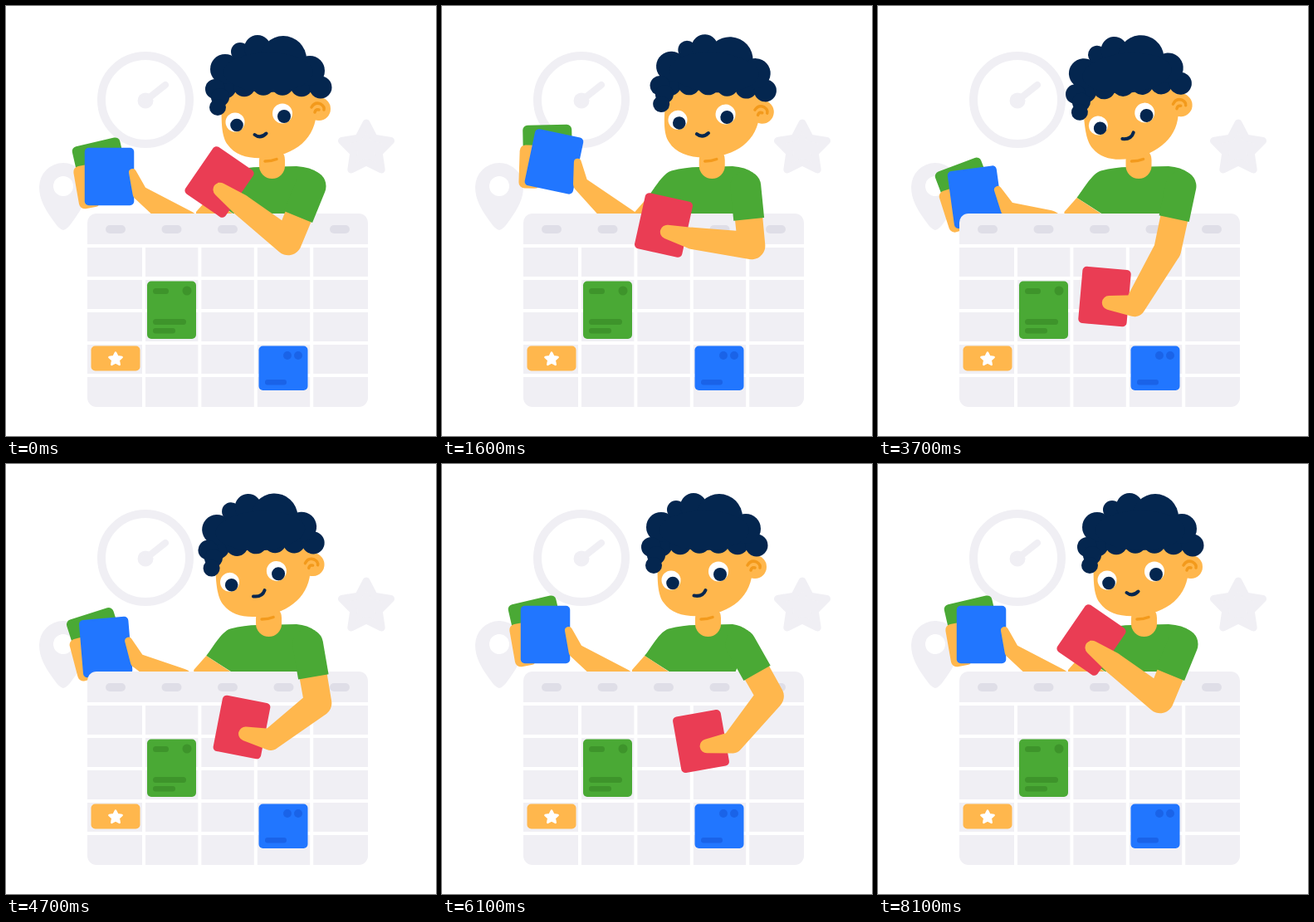
Write an HTML page that moves like this. It is 518 px wide and 518 px high and loops after 8.2 s.

```html
<!DOCTYPE html>
<html lang="en">
<head>
<meta charset="utf-8">
<title>Planning the week</title>
<style>
  html, body { margin: 0; width: 100%; height: 100%; overflow: hidden; background: #fff; }
  svg { display: block; width: 100vw; height: 100vh; }
</style>
</head>
<body>
<svg id="stage" viewBox="0 0 518 518"></svg>
<script>
const LOOP = 8200, STEP = 100;
const SKIN = '#ffb74d', SHADE = '#f39a1c', NAVY = '#04264f', GREEN = '#4aa935',
      BLUE = '#2176ff', RED = '#ea3d54', PALE = '#f0eff4', PILL = '#dfdee7';

// Places the red card visits: x, y, turn
const CHEST = [257, 212, 34.5], NEAR = [267, 264, 12.5], RIGHT = [312, 334, -10],
      LEFT = [284, 317, 11], LOW = [273, 350, 5], LIFTED = [309, 313, 11];

// Each track eases from one [time, values] stop to the next
const CARD = [[0, CHEST], [800, LOW], [1600, NEAR], [2800, RIGHT], [3600, LOW], [4400, LOW],
              [4700, LEFT], [6100, RIGHT], [6900, LIFTED], [7900, CHEST]];
const LEAN = [[0, [0]], [1600, [9.5]], [2300, [9.5]], [3650, [-13]], [6100, [0]], [6900, [3.5]], [7900, [0]]];
const SMILE = [[0, [0]], [1600, [0.1]], [2700, [-1]], [3600, [1]], [6900, [1]], [7900, [0]]];

function follow(track, t) {
  const next = track.findIndex(([at]) => at > t);
  if (next < 0) return track[track.length - 1][1];
  const [t0, from] = track[next - 1], [t1, to] = track[next];
  const s = (t - t0) / (t1 - t0), e = s * s * (3 - 2 * s);
  return from.map((v, i) => v + (to[i] - v) * e);
}

const loop = (n, draw) => Array.from({ length: n }, (_, i) => draw(i)).join('');
const rect = (x, y, w, h, r, fill) =>
  `<rect x="${x}" y="${y}" width="${w}" height="${h}" rx="${r}" fill="${fill}"/>`;
const card = (w, h, r, fill) => rect(-w / 2, -h / 2, w, h, r, fill);
const dot = (x, y, r, fill) => `<circle cx="${x}" cy="${y}" r="${r}" fill="${fill}"/>`;
const path = (d, fill, id = '') => `<path id="${id}" d="${d}" fill="${fill}"/>`;
const line = (d, color, width, id = '') =>
  `<path id="${id}" d="${d}" fill="none" stroke="${color}" stroke-width="${width}" stroke-linecap="round"/>`;

function star(cx, cy, outer, inner, fill, soft) {
  const points = loop(10, i => {
    const a = i * Math.PI / 5 - Math.PI / 2, r = i % 2 ? inner : outer;
    return `${(cx + r * Math.cos(a)).toFixed(1)},${(cy + r * Math.sin(a)).toFixed(1)} `;
  });
  return `<polygon points="${points}" fill="${fill}" stroke="${fill}" stroke-width="${soft}" stroke-linejoin="round"/>`;
}

function backdrop() {
  return `<circle cx="168" cy="113" r="53" fill="none" stroke="${PALE}" stroke-width="10"/>`
    + dot(168, 114, 9.5, PALE) + line('M168 114 L192 95', PALE, 8)
    + star(434, 172, 31, 16, PALE, 9)
    + path('M69 270 Q64 269 58 260 C48 246 40 234 40 218 A29 29 0 0 1 98 218 C98 234 90 246 80 260 Q74 269 69 270 Z', PALE)
    + dot(69, 217, 12, '#fff');
}

function calendar() {
  const leaf = '#3e942b', deep = '#1a63e8';
  return rect(98, 250, 338, 233, 11, PALE)
    + loop(5, i => rect(98, 287 + i * 39, 338, 4, 0, '#fff'))
    + loop(4, i => rect(164 + i * 67.4, 289, 4, 194, 0, '#fff'))
    + loop(5, i => rect(120 + i * 67.5, 264, 24, 10, 5, PILL))
    + rect(170, 331.5, 59, 69.5, 5, GREEN) + rect(177, 340, 19, 7, 3.5, leaf) + dot(218, 343, 5.5, leaf)
    + rect(177, 377, 40, 7, 3.5, leaf) + rect(177, 388, 27, 6.5, 3.2, leaf)
    + rect(102.5, 409.5, 59, 30, 5, SKIN) + star(132, 425.5, 8, 4, '#fff', 2.5)
    + rect(304.5, 409.5, 59, 53.5, 5, BLUE) + dot(339, 421, 5, deep) + dot(352, 421, 5, deep)
    + rect(312, 450, 26, 6.5, 3.2, deep);
}

function hair() {
  const fringe = loop(6, i => dot(264 + 23 * i, 98 - 4 * Math.sin(i * Math.PI / 5), 13.5, NAVY));
  const crown = dot(264, 76, 18, NAVY) + dot(282, 55, 11, NAVY) + dot(303, 51, 16, NAVY)
    + dot(334, 64, 28, NAVY) + dot(366, 78, 18, NAVY);
  const lock = dot(252, 100, 12, NAVY) + dot(258, 110, 11, NAVY) + dot(255, 122, 10, NAVY);
  return fringe + crown + lock + `<ellipse cx="316" cy="80" rx="54" ry="24" fill="${NAVY}"/>`;
}

function head() {
  return dot(377, 124, 14, SKIN)
    + path('M261 100 C258 140 260 158 267 167 C276 180 292 184 311 183 C349 180 374 159 374 125 L372 90 Z', SKIN)
    + line('M368 122 Q372 115 379 118 Q384 121 383 125 M372 128 Q373 124 377 125', SHADE, 3.5)
    + dot(276, 140, 11.5, '#fff') + dot(333, 129.5, 12, '#fff')
    + dot(278, 143.5, 7.8, NAVY) + dot(335, 133, 8, NAVY)
    + line('', NAVY, 4, 'mouth') + hair();
}

const heldCards = `<g transform="translate(-9.5 -8) rotate(-13)">${card(59, 69, 6, GREEN)}</g>`
  + `<g transform="translate(-27 12) rotate(-10)">${card(26, 52, 7, SKIN)}</g>`
  + card(59.5, 69.5, 5, BLUE);

const stage = document.getElementById('stage');
stage.innerHTML = backdrop()
  + path('', GREEN, 'torso')
  + `<g id="backArm">${path('M244 231 L229 248 L229 262 L290 262 L273 250 Z', SKIN)}</g>`
  + `<g id="neck">${rect(305, 170, 31, 38, 15.5, SKIN)}${line('M312 187 Q320 187 326 184.5', SHADE, 3.5)}</g>`
  + `<g id="head">${head()}</g>`
  + `<g id="held">${heldCards}</g>`
  + path('', SKIN, 'leftArm')
  + calendar()
  + `<g id="card">${card(58.5, 68.5, 5, RED)}</g>`
  + path('', SKIN, 'rightArm')
  + path('', GREEN, 'sleeve');

const el = {};
for (const node of stage.querySelectorAll('[id]')) if (node.id) el[node.id] = node;
const move = (node, x, y = 0, turn = 0, pivot = '') =>
  node.setAttribute('transform', `translate(${x} ${y}) rotate(${turn} ${pivot})`);
const shape = (node, d) => node.setAttribute('d', d);

// A point given in the frame of a turned card
function attach(x, y, deg, px, py) {
  const a = deg * Math.PI / 180, c = Math.cos(a), s = Math.sin(a);
  return [x + px * c - py * s, y + px * s + py * c];
}

// Tapered limb with round ends
function limb([x1, y1], r1, [x2, y2], r2) {
  const dx = x2 - x1, dy = y2 - y1, d = Math.hypot(dx, dy);
  const base = Math.atan2(dy, dx), open = Math.acos((r1 - r2) / d);
  const at = (x, y, r, a) => `${(x + r * Math.cos(a)).toFixed(2)} ${(y + r * Math.sin(a)).toFixed(2)}`;
  return `M${at(x1, y1, r1, base + open)} A${r1} ${r1} 0 ${+(r1 > r2)} 1 ${at(x1, y1, r1, base - open)}`
    + ` L${at(x2, y2, r2, base - open)} A${r2} ${r2} 0 ${+(r2 > r1)} 1 ${at(x2, y2, r2, base + open)} Z `;
}

// Elbow between two joints, bending outwards
function bend([x1, y1], [x2, y2], len) {
  const dx = x2 - x1, dy = y2 - y1, d = Math.hypot(dx, dy);
  const l = Math.max(len, d / 2 + 1), h = Math.sqrt(l * l - d * d / 4);
  return [(x1 + x2) / 2 + dy / d * h, (y1 + y2) / 2 - dx / d * h];
}

function sleeve([sx, sy], [ex, ey]) {
  const d = Math.hypot(ex - sx, ey - sy), ux = (ex - sx) / d, uy = (ey - sy) / d, r = 18.5;
  const nx = -uy * r, ny = ux * r, mx = sx + ux * 40, my = sy + uy * 40;
  return `M${sx + nx} ${sy + ny} A${r} ${r} 0 0 1 ${sx - nx} ${sy - ny}`
    + ` L${mx - nx} ${my - ny} L${mx + nx} ${my + ny} Z`;
}

function draw(t) {
  const [cx, cy, turn] = follow(CARD, t);
  const [lean] = follow(LEAN, t), [smile] = follow(SMILE, t);
  const sway = lean * 0.5, lift = lean / 10;
  const shoulder = [366 - 0.13 * (cx - 265), 217], sx = shoulder[0];

  move(el.neck, sway);
  move(el.head, sway, 0, lean * 0.38, '320 190');
  shape(el.mouth, `M${299.5 + 4 * smile} ${155 + 3.5 * smile}`
    + ` Q${306.5 + 7.5 * smile} 160.5 ${313.5 + 4 * smile} ${153.5 - 1.5 * smile}`);

  const side = sway * 0.7;
  shape(el.torso, `M${244 + side} 231 C${252 + side} 221 ${262 + side} 202 ${273 + side} 198.5`
    + ` Q${290 + side} 194 ${306 + side} 194 L350 193 Q${sx} 194 ${sx + 9} 201 L${sx} 235 L352 254 L${280 + side} 254 Z`);
  move(el.backArm, side);

  const bx = 124.5 + lift * (lift > 0 ? 11 : 5.5), by = 205.5 - lift * 19, tilt = lift * (lift > 0 ? 12.5 : 6);
  const grip = attach(bx, by, tilt, 37, 20), thumb = attach(bx, by, tilt, 28, -5);
  move(el.held, bx, by, tilt);
  shape(el.leftArm, limb(thumb, 4.5, grip, 9) + limb(grip, 9, [216 + 8 * lift, 264], 18));

  const wrist = attach(cx, cy, turn, 37, 8), tip = attach(cx, cy, turn, 6, 7);
  const elbow = bend(shoulder, wrist, 72);
  move(el.card, cx, cy, turn);
  shape(el.rightArm, limb(shoulder, 17, elbow, 16.5) + limb(elbow, 16.5, wrist, 13) + limb(wrist, 13, tip, 8.5));
  shape(el.sleeve, sleeve(shoulder, elbow));
}

const start = performance.now();
function tick() {
  const t = (performance.now() - start) % LOOP;
  draw(Math.floor(t / STEP) * STEP);
  requestAnimationFrame(tick);
}
tick();
</script>
</body>
</html>
```
